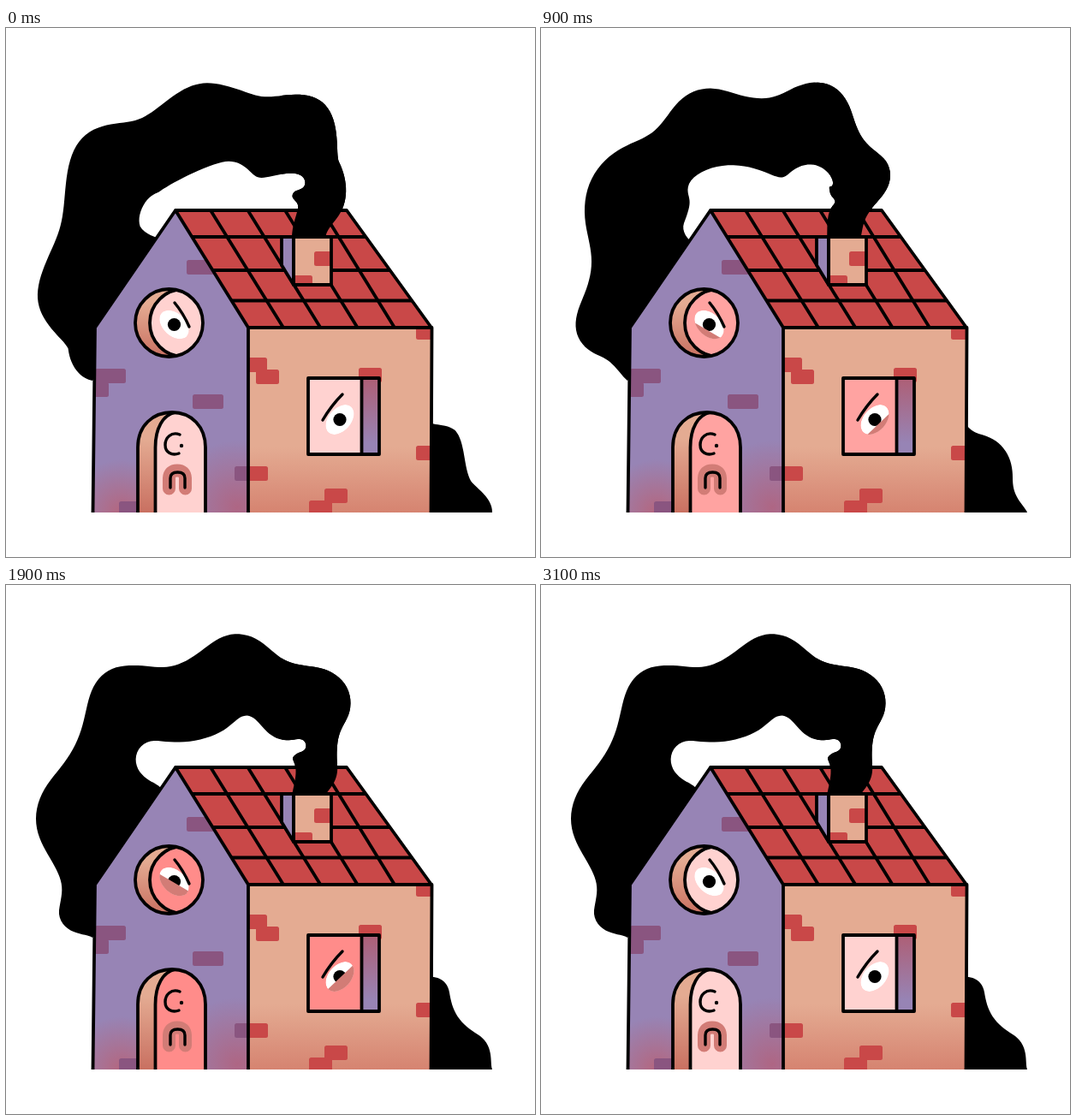
Write an HTML page with a canvas that moves like this. It is 618x618 px and loops after 3.2 s.

```html
<!DOCTYPE html>
<html lang="en">
<head>
<meta charset="utf-8">
<title>Grumpy house</title>
<style>
  html, body { margin: 0; width: 100%; height: 100%; overflow: hidden; background: #fff; }
  canvas { display: block; }
</style>
</head>
<body>
<canvas id="stage" width="618" height="618"></canvas>
<script>
const ctx = document.getElementById('stage').getContext('2d');
const LOOP = 3200, STEP = 100, POSES = 4;
const PURPLE = '#9784b5', PLUM = '#8a5580', TAN = '#e4ab92', RED = '#c94848', SHADE = '#c66a5c', LIP = '#d27c76';

const clamp01 = v => Math.max(0, Math.min(1, v));

// Resting edges of the smoke. Neighbouring key points lie half a wave apart.
const plumeOuter = [[373, 246], [387, 210], [400, 152], [362, 96], [300, 68], [228, 77],
  [154, 94], [95, 140], [52, 228], [49, 315], [62, 380], [101, 412]];
const plumeInner = [[334, 246], [338, 212], [340, 197], [341, 180], [298, 164], [258, 167],
  [173, 182], [167, 228], [200, 262]];
const tailEdge = [[490, 456], [518, 476], [551, 525], [568, 566]];

// Catmull-Rom position at s, where whole numbers fall on the key points.
function along(keys, s) {
  const i = Math.min(Math.floor(s), keys.length - 2), f = s - i;
  const key = n => keys[Math.max(0, Math.min(keys.length - 1, n))];
  return [0, 1].map(axis => {
    const [a, b, c, d] = [-1, 0, 1, 2].map(n => key(i + n)[axis]);
    return b + f / 2 * (c - a + f * (2 * a - 5 * b + 4 * c - d + f * (3 * (b - c) + d - a)));
  });
}

// Sways an edge sideways with a wave that travels a quarter period per pose.
function sway(keys, swing, rise, phase) {
  const last = keys.length - 1, points = [];
  for (let s = 0; s <= last; s += 1 / 16) {
    const [x, y] = along(keys, s);
    const [x0, y0] = along(keys, Math.max(0, s - .05));
    const [x1, y1] = along(keys, Math.min(last, s + .05));
    const length = Math.hypot(x1 - x0, y1 - y0);
    const envelope = Math.min(clamp01(s / 2 / rise), clamp01(last - s));
    const shift = swing * envelope * Math.cos(Math.PI * (s - 1) - 2 * Math.PI * phase);
    points.push([x - (y1 - y0) / length * shift, y + (x1 - x0) / length * shift]);
  }
  return points;
}

function polygon(points) {
  const path = new Path2D();
  points.forEach(p => path.lineTo(...p));
  path.closePath();
  return path;
}

const plumes = [], tails = [];
for (let pose = 0; pose < POSES; pose++) {
  const phase = pose / POSES;
  plumes.push(polygon([...sway(plumeOuter, 12, 1, phase), ...sway(plumeInner, 11, 2, phase).reverse()]));
  tails.push(polygon([...sway(tailEdge, -9, .5, phase), [490, 566]]));
}

const toPath = shape => shape instanceof Path2D ? shape : new Path2D(shape);

function fill(shape, color) {
  ctx.fillStyle = color;
  ctx.fill(toPath(shape));
}

function stroke(shape, width = 3.8, color = '#000') {
  ctx.strokeStyle = color;
  ctx.lineWidth = width;
  ctx.stroke(toPath(shape));
}

function clipped(shape, draw) {
  ctx.save();
  ctx.clip(toPath(shape));
  draw();
  ctx.restore();
}

function vertical(y0, y1, from, to) {
  const g = ctx.createLinearGradient(0, y0, 0, y1);
  g.addColorStop(0, from);
  g.addColorStop(1, to);
  return g;
}

function glow(x, y, r, rgb, alpha) {
  const g = ctx.createRadialGradient(x, y, 0, x, y, r);
  g.addColorStop(0, `rgba(${rgb},${alpha})`);
  g.addColorStop(1, `rgba(${rgb},0)`);
  ctx.fillStyle = g;
  ctx.fillRect(x - r, y - r, 2 * r, 2 * r);
}

function bricks(color, width, corners) {
  for (const [x, y] of corners) {
    const path = new Path2D();
    path.roundRect(x, y, width, 17, 2.5);
    fill(path, color);
  }
}

function disc(x, y, r) {
  const path = new Path2D();
  path.arc(x, y, r, 0, 2 * Math.PI);
  return path;
}

function drawWalls() {
  const side = 'M198 213 L104 350 L101 566 H283 V350 Z';
  clipped(side, () => {
    fill(side, PURPLE);
    glow(135, 566, 62, '190,92,108', .75);
    glow(270, 560, 78, '182,92,115', .75);
    bricks(PLUM, 36, [[211, 271], [104, 398], [84, 414], [218, 428], [267, 512], [132, 553]]);
  });
  const front = 'M283 350 H497 L496 566 H283 Z';
  clipped(front, () => {
    fill(front, TAN);
    fill(front, vertical(490, 566, 'rgba(204,105,90,0)', 'rgba(204,105,90,.6)'));
    bricks(RED, 27, [[278, 385], [292, 399], [412, 397], [479, 347], [479, 488],
      [279, 512], [372, 538], [354, 552]]);
  });
  stroke('M198 213 L104 350 L101.5 566 M283 350 V566 M497.5 350 L496.5 566');
}

function drawRoof() {
  const roof = 'M198 213 H398 L497 350 H283 Z';
  fill(roof, RED);
  clipped(roof, () => {
    for (const y of [244, 283, 318.5]) stroke(`M198 ${y} H497`);
    for (let i = 0; i < 4; i++) stroke(`M${239 + 43.5 * i} 213 L${324 + 43.3 * i} 350`);
  });
  stroke(roof);
}

function drawChimney() {
  const side = 'M322 244 H336 V300 L322 277 Z';
  const front = 'M336 244 H380 V300 H336 Z';
  fill(side, PURPLE);
  fill(front, TAN);
  clipped(front, () => bricks(RED, 27, [[360, 261], [331, 289]]));
  stroke(side);
  stroke(front);
}

// The lower lid is a half-plane sliding up over the eye as anger grows.
function drawEye(x, y, tilt, lidAngle, anger) {
  const white = new Path2D();
  white.ellipse(x, y, 20, 13.3, tilt, 0, 2 * Math.PI);
  clipped(white, () => {
    fill(white, '#fff');
    fill(disc(x, y, 7.6), '#000');
    ctx.translate(x, y);
    ctx.rotate(lidAngle);
    ctx.fillStyle = LIP;
    ctx.fillRect(-40, 1 + 17 * (1 - anger), 80, 40);
  });
}

function drawFace(anger) {
  const blend = (calm, cross) => Math.round(calm + (cross - calm) * anger);
  const skin = `rgb(255,${blend(210, 140)},${blend(208, 138)})`;

  const porthole = disc(190.5, 344.5, 39.5);
  clipped(porthole, () => {
    fill(porthole, vertical(322, 392, TAN, SHADE));
    const inner = disc(207.5, 344.5, 39.5);
    fill(inner, skin);
    stroke(inner);
  });
  stroke(porthole);
  drawEye(196.5, 346.5, .75, .53, anger);
  stroke('M197 321 Q207 333 214 349', 3.4);

  fill('M353 409 H415 V498 H353 Z', skin);
  fill('M415 409 H436 V498 H415 Z', vertical(412, 485, '#ad6078', PURPLE));
  stroke('M353 409 H436 V498 H353 Z M415.5 409 V498');
  drawEye(390, 457.5, -.85, -.76, anger);
  stroke('M370 458 Q380 441 393 428', 3.4);

  const door = 'M154 566 V490 C154 464 172 449 194 449 C217 449 233 466 233 490 V566';
  const innerEdge = 'M174.5 568 V490 C174.5 468 183 452 198 449';
  clipped(door, () => {
    fill(door, vertical(480, 575, TAN, SHADE));
    fill(innerEdge + ' H240 V568', skin);
    stroke(innerEdge);
  });
  stroke(door);
  stroke('M203 475 C193 471 186 479 186 487 C186 496 194 500 202 497', 3.4);
  fill(disc(205, 488, 2.2), '#000');
  stroke('M190.5 538 V526 Q191 517 200 517 Q209 517 209.5 526 V538', 15, LIP);
  stroke('M192 537 V526 Q192 519 200.5 519 Q209 519 209 526 V537', 3.4);
}

function angerAt(t) {
  const ramp = (from, to) => clamp01((t - from) / (to - from));
  return ramp(500, 1100) - ramp(2100, 2600);
}

function draw(now) {
  const tick = Math.floor((now % LOOP) / STEP);
  const pose = tick % POSES;
  ctx.lineCap = ctx.lineJoin = 'round';
  ctx.fillStyle = '#fff';
  ctx.fillRect(0, 0, 618, 618);
  clipped('M0 0 H618 V566 H0 Z', () => {
    fill(plumes[pose], '#000');
    fill(tails[pose], '#000');
    drawWalls();
    drawRoof();
    clipped('M322 0 H618 V245 H322 Z', () => fill(plumes[pose], '#000'));
    drawChimney();
    drawFace(angerAt(tick * STEP));
  });
}

const start = performance.now();
function loop() {
  draw(performance.now() - start);
  requestAnimationFrame(loop);
}
loop();
</script>
</body>
</html>
```
